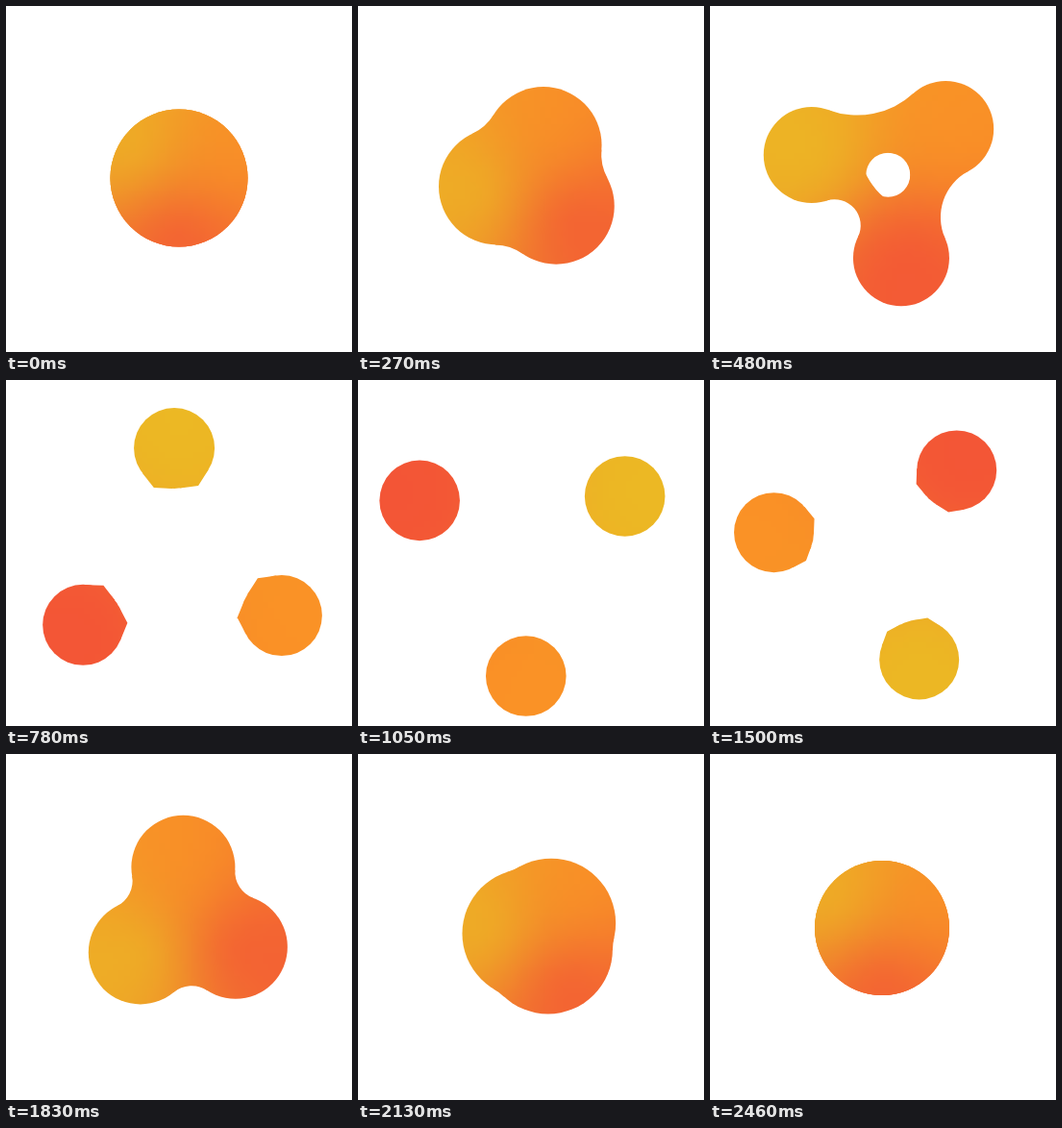
An HTML page with a canvas that plays this animation: 360 by 360 pixels, repeating every 2490 ms.

```html
<!DOCTYPE html>
<html lang="en">
<head>
<meta charset="utf-8">
<title>Liquid loader</title>
<style>
  html, body { margin: 0; width: 100%; height: 100%; overflow: hidden; background: #fff; }
  canvas { display: block; }
</style>
</head>
<body>
<canvas id="stage" width="360" height="360"></canvas>
<script>
const LOOP = 2490, STEP = 30, SIZE = 360, CELL = 6;
const THIRD = Math.PI * 2 / 3;
const COLORS = [[236, 185, 36], [250, 146, 38], [243, 84, 54]];

// time, centre x, centre y, orbit, radius, angle
const MOTION = [
  [0, 180, 179, 0, 71.5, 212],
  [240, 181, 180, 32, 62, 168],
  [480, 183.3, 181.7, 82, 50, 199],
  [540, 183, 183, 92, 48.5, 213],
  [640, 182, 187, 106, 45, 236],
  [780, 180.7, 190.3, 119.5, 42, 267.3],
  [1050, 172.2, 184.8, 123.3, 41.8, 328.8],
  [1335, 176, 179, 122, 41.5, 393.7],
  [1500, 180.3, 181.2, 116, 41.5, 431.2],
  [1620, 183, 179, 104, 45, 458.6],
  [1830, 187.7, 175, 57.3, 54, 506.7],
  [2190, 191, 190, 10, 69, 553],
  [2460, 179, 181, 0, 70, 570],
  [2490, 180, 179, 0, 71.5, 572]
];
// neck thickness, neck lopsidedness, length of loose tips
const NECK = [[0, 0.5], [300, 0.5], [480, 0.37], [540, 0.28], [640, 0], [1620, 0], [1830, 0.5], [LOOP, 0.5]];
const SKEW = [[0, 0], [300, 0], [480, 1], [640, 0], [LOOP, 0]];
const TIP = [[640, 1], [700, 0.3], [780, 0.07], [900, 0], [1400, 0], [1500, 0.05], [1560, 0.25], [1620, 1], [LOOP, 1]];
const SKEW_OUT = [0.23, 0.07, -0.31], SKEW_IN = [-0.13, -0.03, 0.17];

const ctx = document.getElementById('stage').getContext('2d');
const tint = document.createElement('canvas');
tint.width = tint.height = SIZE / CELL;
const tintCtx = tint.getContext('2d');
const pixels = tintCtx.createImageData(tint.width, tint.height);

const polar = (p, r, a) => ({ x: p.x + r * Math.cos(a), y: p.y + r * Math.sin(a) });

function segment(table, t) {
  let i = 0;
  while (i < table.length - 2 && t >= table[i + 1][0]) i++;
  return i;
}

function linear(table, t) {
  const i = segment(table, t), [t0, a] = table[i], [t1, b] = table[i + 1];
  return a + (b - a) * Math.min(1, Math.max(0, (t - t0) / (t1 - t0)));
}

function spline(table, t, col) {
  const i = segment(table, t), p = table[i], q = table[i + 1];
  const slope = k => {
    const a = table[k - 1], b = table[k + 1];
    return a && b ? (b[col] - a[col]) / (b[0] - a[0]) : 0;
  };
  const w = q[0] - p[0], u = (t - p[0]) / w, v = 1 - u;
  return v * v * (1 + 2 * u) * p[col] + u * u * (3 - 2 * u) * q[col]
    + w * u * v * (v * slope(i) - u * slope(i + 1));
}

function disc(p, r) {
  ctx.beginPath();
  ctx.arc(p.x, p.y, r, 0, Math.PI * 2);
  ctx.fill();
}

// Fillet that touches two equal circles and meets their axis at height h.
function fillet(a, b, mid, dir, half, r, h) {
  const rho = (half * half + h * h - r * r) / (2 * (r - h));
  const f = polar(mid, h + rho, dir), k = r / (r + rho);
  const touch = c => ({ x: c.x + (f.x - c.x) * k, y: c.y + (f.y - c.y) * k });
  const p = touch(a), q = touch(b);
  const corner = polar(mid, h + rho - rho * (r + rho) / (h + rho), dir);
  ctx.lineTo(p.x, p.y);
  ctx.arcTo(corner.x, corner.y, q.x, q.y, rho);
  ctx.lineTo(q.x, q.y);
}

function bridge(a, b, mid, dir, half, r, out, inn) {
  const base = Math.sqrt(Math.max(0, r * r - half * half));
  const height = e => base + e * (r - base);
  ctx.beginPath();
  ctx.moveTo(a.x, a.y);
  fillet(a, b, mid, dir, half, r, height(out));
  ctx.lineTo(b.x, b.y);
  fillet(b, a, mid, dir + Math.PI, half, r, height(inn));
  ctx.fill();
}

function tip(p, dir, r, len) {
  const spread = Math.min(0.75, Math.acos(r / len));
  const end = polar(p, len, dir), cross = polar(p, r / Math.cos(spread), dir);
  const left = polar(p, r, dir - spread), right = polar(p, r, dir + spread);
  const ctrl = s => [s.x * 0.45 + cross.x * 0.55, s.y * 0.45 + cross.y * 0.55];
  ctx.beginPath();
  ctx.moveTo(p.x, p.y);
  ctx.lineTo(left.x, left.y);
  ctx.quadraticCurveTo(...ctrl(left), end.x, end.y);
  ctx.quadraticCurveTo(...ctrl(right), right.x, right.y);
  ctx.fill();
}

// Middle of the joined shape, with a round opening once the balls part.
function core(balls, c, d, skew) {
  const hole = 23 + 1.8 * (d - 82);
  if (hole > d / 2) return;
  ctx.beginPath();
  balls.forEach(b => ctx.lineTo(b.x, b.y));
  ctx.closePath();
  if (hole > 0) {
    const x = c.x + 2 * skew, y = c.y - 6 * skew;
    ctx.moveTo(x + hole, y);
    ctx.arc(x, y, hole, 0, Math.PI * 2);
  }
  ctx.fill('evenodd');
}

function paint(c, d, angle) {
  const seeds = COLORS.map((_, i) => polar(c, Math.max(d, 55), angle + i * THIRD));
  const n = tint.width;
  for (let y = 0; y < n; y++) {
    for (let x = 0; x < n; x++) {
      const w = seeds.map(s => Math.exp(-Math.hypot((x + 0.5) * CELL - s.x, (y + 0.5) * CELL - s.y, 20) / 43));
      const sum = w[0] + w[1] + w[2], o = (y * n + x) * 4;
      for (let k = 0; k < 3; k++) {
        pixels.data[o + k] = (w[0] * COLORS[0][k] + w[1] * COLORS[1][k] + w[2] * COLORS[2][k]) / sum;
      }
      pixels.data[o + 3] = 255;
    }
  }
  tintCtx.putImageData(pixels, 0, 0);
  ctx.globalCompositeOperation = 'source-in';
  ctx.drawImage(tint, 0, 0, SIZE, SIZE);
  ctx.globalCompositeOperation = 'source-over';
}

function draw(t) {
  const [x, y, orbit, r, deg] = [1, 2, 3, 4, 5].map(col => spline(MOTION, t, col));
  const c = { x, y }, d = Math.max(0, orbit), angle = deg * Math.PI / 180;
  const balls = COLORS.map((_, i) => polar(c, d, angle + i * THIRD));
  const half = d * Math.sin(THIRD);
  const neck = linear(NECK, t), skew = linear(SKEW, t);
  const len = r + (half - r) * linear(TIP, t);

  ctx.clearRect(0, 0, SIZE, SIZE);
  balls.forEach(b => disc(b, r));
  if (neck > 0) core(balls, c, d, skew);
  balls.forEach((a, i) => {
    const b = balls[(i + 1) % 3], dir = angle + (i + 0.5) * THIRD;
    if (neck > 0) {
      if (half > 2) {
        bridge(a, b, polar(c, d / 2, dir), dir, half, r,
          neck + skew * SKEW_OUT[i], neck + skew * SKEW_IN[i]);
      }
    } else if (len > r + 0.3) {
      tip(a, dir + Math.PI / 2, r, len);
      tip(b, dir - Math.PI / 2, r, len);
    }
  });
  paint(c, d, angle);
}

const start = performance.now();
function tick() {
  const t = (performance.now() - start) % LOOP;
  draw(Math.floor(t / STEP) * STEP);
  requestAnimationFrame(tick);
}
tick();
</script>
</body>
</html>
```
